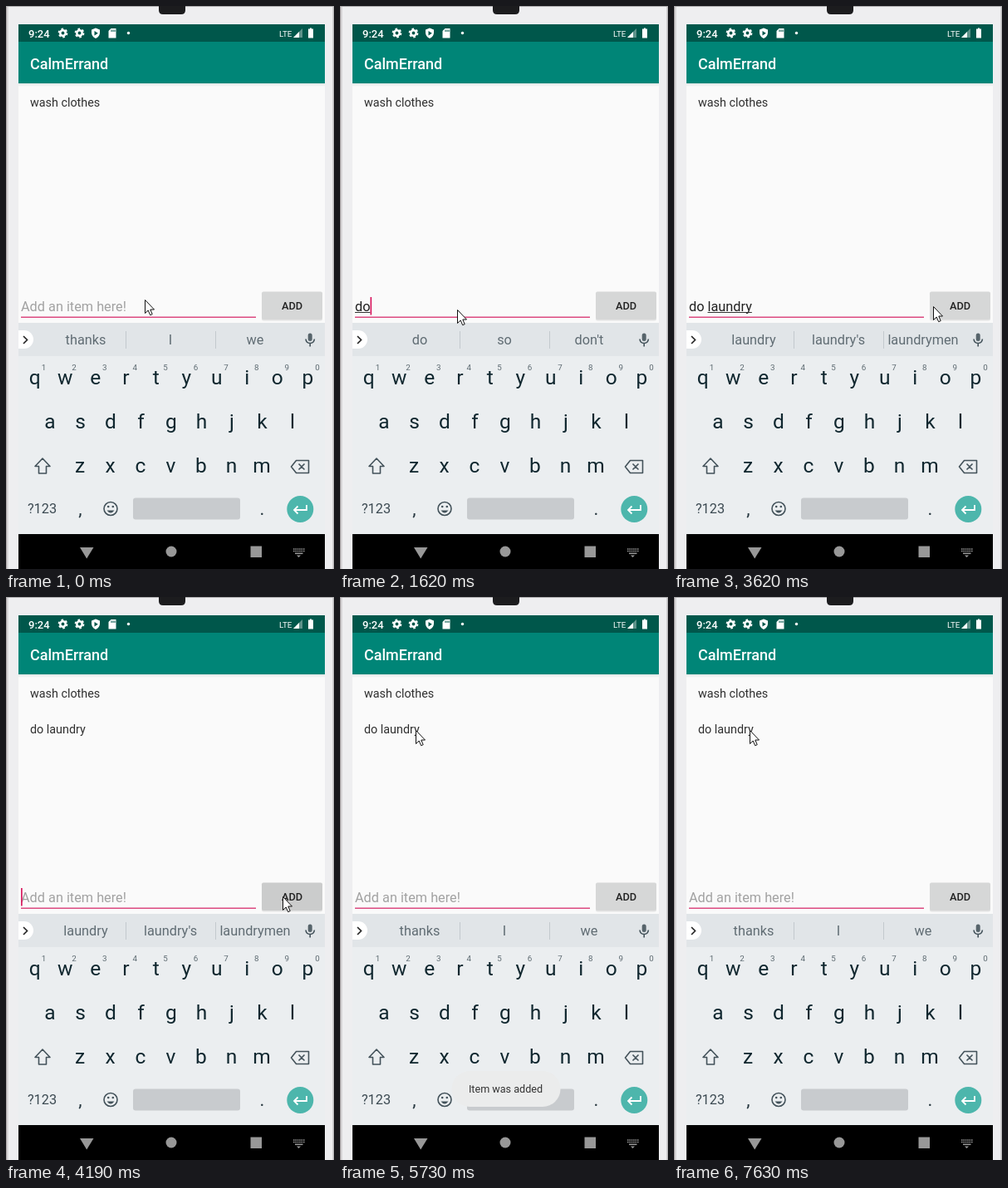
Write an HTML page that moves like this. It is 395 px wide and 677 px high and loops after 8 s.

```html
<!DOCTYPE html>
<html lang="en">
<head>
<meta charset="utf-8">
<title>To-do list</title>
<style>
  html, body { margin: 0; width: 100%; height: 100%; overflow: hidden; background: #eeeef0; }
  svg { display: block; width: 395px; height: 677px; font-family: Roboto, "Liberation Sans", sans-serif; }
  text { white-space: pre; }
  .mid { text-anchor: middle; }
  .line { fill: none; stroke: #43525a; stroke-width: 1.6; }
</style>
</head>
<body>
<svg viewBox="0 0 395 677">
  <defs>
    <linearGradient id="shade" x2="0" y2="1">
      <stop stop-color="#dfe6e5"/><stop offset="1" stop-color="#fafafa"/>
    </linearGradient>
    <g id="gear" fill="none" stroke="#fff">
      <circle r="3.2" stroke-width="2.5"/>
      <circle r="5" stroke-width="1.8" stroke-dasharray="2.6 2.636"/>
    </g>
  </defs>

  <!-- phone body -->
  <rect width="395" height="677" fill="#eeeef0"/>
  <rect width="1.5" height="677" fill="#aaa5a7"/>
  <rect x="1.5" width="1.5" height="677" fill="#dcdadc"/>
  <rect x="393.5" width="1.5" height="677" fill="#b9b8ba"/>
  <rect width="395" height="1" fill="#aaa9ab"/>
  <path d="M184 0H216V5Q216 10 211 10H189Q184 10 184 5Z" fill="#1c1c1e"/>

  <!-- status and title bars -->
  <rect x="15" y="22" width="369" height="21" fill="#00574b"/>
  <rect x="15" y="43" width="369" height="50" fill="#008577"/>
  <text x="27" y="37.5" font-size="13" font-weight="500" fill="#fff">9:24</text>
  <use href="#gear" x="68.5" y="32.5"/>
  <use href="#gear" x="88.5" y="32.5"/>
  <path d="M108 26.5L113 28.5V32Q113 36.500 108 39Q103 36.500 103 32V28.500Z" fill="#fff"/>
  <path d="M106.500 30V35.500L110.800 32.700Z" fill="#00574b"/>
  <path d="M126.500 27H132.500V38.500H123.500V30Z" fill="#fff"/>
  <path d="M127 28.500V31M129 28.500V31M131 28.500V31" stroke="#00574b"/>
  <circle cx="147.500" cy="32.500" r="1.700" fill="#fff"/>
  <text x="329" y="36.500" font-size="9.800" fill="#fff">LTE</text>
  <path d="M357 27V38H346Z" fill="#5f938b"/>
  <path d="M353 31V38H346Z" fill="#fff"/>
  <path d="M366 26.500H368V27.500H370V38.500H364V27.500H366Z" fill="#fff"/>
  <text x="29" y="75.500" font-size="18" font-weight="500" fill="#fff">CalmErrand</text>

  <!-- list and input -->
  <rect x="15" y="93" width="369" height="288" fill="#fafafa"/>
  <rect x="15" y="93" width="369" height="4" fill="url(#shade)"/>
  <g font-size="14.350" fill="#303030">
    <text x="29" y="120.500">wash clothes</text>
    <text id="item" x="29" y="163.500">do laundry</text>
  </g>
  <rect x="18" y="373.500" width="283" height="1.500" fill="#dc4a80"/>
  <text id="entry" x="18" y="367" font-size="16.300"></text>
  <rect id="underline" y="368" height="1" fill="#333"/>
  <rect id="caret" y="350" width="1.700" height="21.500" fill="#d81b60"/>
  <rect x="308" y="344.500" width="73" height="34" rx="2" fill="#e4e4e4"/>
  <rect id="button" x="308" y="343.500" width="73" height="33.500" rx="2"/>
  <text x="344.500" y="364.700" class="mid" font-size="12.800" font-weight="500" fill="#222">ADD</text>

  <!-- keyboard -->
  <rect x="15" y="381" width="369" height="254" fill="#ebeef0"/>
  <rect x="15" y="381" width="369" height="40" fill="#e1e5e8"/>
  <path d="M15 390H22A11 11 0 0 1 22 412H15Z" fill="#fff"/>
  <path d="M21 397L25.500 401.500L21 406" class="line" style="stroke:#222"/>
  <path d="M144.500 391V412M252.500 391V412" stroke="#c3c9cd"/>
  <g id="suggestions" class="mid" font-size="16.300"></g>
  <rect x="363.700" y="393.500" width="5" height="9.500" rx="2.500" fill="#56646b"/>
  <path d="M361 400.500Q361.500 405.500 366.200 405.500T371.400 400.500M366.200 405.500V409.500" class="line"/>
  <g id="keys" class="mid"></g>
  <path d="M44 544L53 553.500H48.500V562H39.500V553.500H35Z" class="line" stroke-linejoin="round"/>
  <path d="M349.500 546.500H364.500V561.500H349.500L343.500 554ZM352.500 550.500L359.500 557.500M359.500 550.500L352.500 557.500" class="line" stroke-linejoin="round"/>
  <text x="43.500" y="610" class="mid" font-size="16.300" fill="#3c4a52">?123</text>
  <circle cx="126" cy="604.500" r="8" class="line"/>
  <path d="M121.500 606.500Q126 612.500 130.500 606.500Z" fill="#43525a"/>
  <circle cx="123.200" cy="602" r="1.300" fill="#43525a"/>
  <circle cx="128.800" cy="602" r="1.300" fill="#43525a"/>
  <rect x="153" y="591.500" width="129" height="26" rx="3" fill="#c8cbce"/>
  <circle cx="354.300" cy="605" r="16" fill="#4db6ac"/>
  <path d="M362 600V606H347.500M351.500 601.500L347 606L351.500 610.500" class="line" style="stroke:#fff;stroke-width:1.800"/>

  <!-- navigation bar -->
  <rect x="15" y="635" width="369" height="42"/>
  <g fill="#989898">
    <path d="M89 651H105.500L97.200 664.500Z"/>
    <circle cx="199" cy="656" r="6.500"/>
    <rect x="294.500" y="649.500" width="13.500" height="13.500"/>
    <path d="M350 660.500H355L352.500 663Z"/>
  </g>
  <path d="M346 653H359.500M346 655.500H359.500" stroke="#989898" stroke-width="1.500" stroke-dasharray="1.500 .9"/>
  <path d="M348 658.300H357.500" stroke="#989898" stroke-width="1.500"/>

  <g id="toast">
    <rect x="134.500" y="570" width="131" height="43" rx="21.500" fill="#ebecec"/>
    <text x="199.500" y="596" class="mid" font-size="12.600" fill="#333">Item was added</text>
  </g>
  <path id="pointer" d="M.5 .5V16.500L4.200 13L6.700 18.700L9.200 17.600L6.800 12H11.500Z" fill="#fff" stroke="#111" stroke-linejoin="round"/>
</svg>
<script>
const LOOP = 8000;
const $ = id => document.getElementById(id);
const SVG = 'http://www.w3.org/2000/svg';

function addText(parent, x, y, content, size, fill) {
  const el = document.createElementNS(SVG, 'text');
  const attrs = { x, y, 'font-size': size, fill };
  for (const name in attrs) el.setAttribute(name, attrs[name]);
  el.textContent = content;
  parent.append(el);
  return el;
}

function addRow(letters, firstX, y) {
  [...letters].forEach((key, i) => addText($('keys'), firstX + i * 36.5, y, key, 24.5, '#10272f'));
}
addRow('qwertyuiop', 34.8, 455);
addRow('asdfghjkl', 53, 507.5);
addRow('zxcvbnm', 89, 560.5);
[...'1234567890'].forEach((digit, i) => addText($('keys'), 45.5 + i * 36.6, 437.5, digit, 9.8, '#5d6a71'));
addText($('keys'), 89.5, 612, ',', 22, '#26373f');
addText($('keys'), 308.5, 612, '.', 22, '#26373f');

const chips = [96, 198, 300].map(x => addText($('suggestions'), x, 407.3, '', 16.3, '#606c73'));

// Each track lists [start time, value]; a value holds until the next start.
const typed = [
  [0, ''], [1620, 'do'], [1900, 'do '], [2020, 'do l'], [2140, 'do la'],
  [2290, 'do lau'], [2410, 'do laun'], [2530, 'do laund'], [2650, 'do laundr'],
  [2930, 'do laundry'], [4190, '']
];
const suggested = [
  [0, 'thanks I we'], [1620, "do so don't"], [1900, 'it you not'], [2020, 'l like less'],
  [2140, 'la laundry latter'], [2290, 'lau laundry launch'], [2410, 'lau laundry launch'],
  [2530, 'laun laundry launch'], [2650, 'laund laundry launder'],
  [2770, 'laundr laundry laundromat'], [2930, "laundry laundry's laundrymen"],
  [4460, 'thanks I we']
];
const caretToggles = [270, 830, 1220, 3360, 3900, 4760, 5180, 5730, 6160, 6670, 7070, 7630];
const pointerAt = [
  [0, [167, 353]], [830, [150, 361]], [950, [142, 364]], [1100, [141, 365]],
  [3500, [232, 363]], [3620, [312, 361]], [3770, [330, 361]], [3900, [333, 360]],
  [4760, [107, 318]], [4920, [58, 200]], [5060, [76, 178]], [5180, [88, 165]], [5330, [91, 160]]
];
const buttonFill = [[0, '#d6d7d7'], [4040, '#bfc0c0'], [4190, '#cbcccc'], [4310, '#d6d7d7']];
const toastAlpha = [[0, 0], [4460, .35], [4620, .75], [4760, 1], [6400, .75], [6550, .3], [6670, 0]];

const valueAt = (track, t) => track.filter(([start]) => start <= t).pop()[1];

const pen = document.createElement('canvas').getContext('2d');
pen.font = '16.3px Roboto, "Liberation Sans", sans-serif';
const widthOf = s => pen.measureText(s).width;

function draw(t) {
  const text = valueAt(typed, t);
  $('entry').textContent = text || 'Add an item here!';
  $('entry').setAttribute('fill', text ? '#222' : '#a2a2a2');

  const wordStart = widthOf(text.slice(0, text.lastIndexOf(' ') + 1));
  const end = widthOf(text);
  $('underline').setAttribute('x', 18 + wordStart);
  $('underline').setAttribute('width', end - wordStart);

  const caretOn = caretToggles.filter(time => time <= t).length % 2;
  $('caret').setAttribute('x', 18 + end);
  $('caret').setAttribute('opacity', caretOn);

  valueAt(suggested, t).split(' ').forEach((word, i) => {
    const best = i === 1 && word === 'laundry';
    chips[i].textContent = word;
    chips[i].setAttribute('font-weight', best ? 700 : 400);
    chips[i].setAttribute('fill', best ? '#111' : '#606c73');
  });

  $('item').setAttribute('opacity', t >= 4190 ? 1 : 0);
  $('button').setAttribute('fill', valueAt(buttonFill, t));
  $('toast').setAttribute('opacity', valueAt(toastAlpha, t));
  $('pointer').setAttribute('transform', `translate(${valueAt(pointerAt, t)})`);
}

const began = performance.now();
function tick() {
  draw((performance.now() - began) % LOOP);
  requestAnimationFrame(tick);
}
tick();
</script>
</body>
</html>
```
